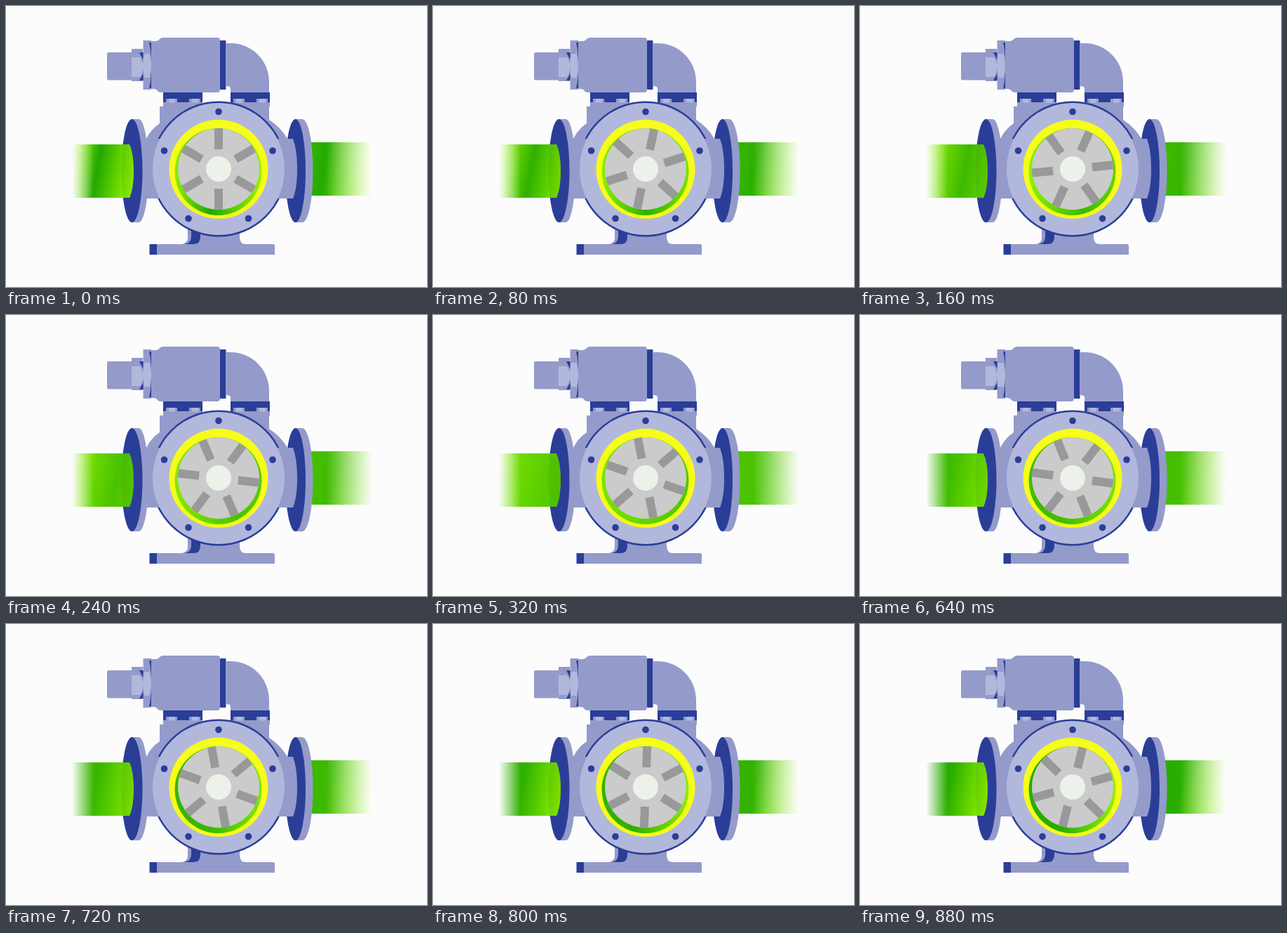
Recreate the animation shown at these times as an HTML page. Size 600 px wide and 400 px high, loop 960 ms.

```html
<!DOCTYPE html>
<html lang="en">
<head>
<meta charset="utf-8">
<title>Vane pump</title>
<style>
  html, body { margin: 0; width: 100%; height: 100%; overflow: hidden; background: #fcfcfc; }
  svg { display: block; width: 600px; height: 400px; }
  .mid { fill: #949bca; }
  .light { fill: #b2b8dc; }
  .dark { fill: #2a3e98; }
</style>
</head>
<body>
<svg viewBox="0 0 600 400">
  <defs>
    <linearGradient id="inlet" gradientUnits="userSpaceOnUse" x1="95" y1="227" x2="182" y2="243"/>
    <linearGradient id="chamber" gradientUnits="userSpaceOnUse" x1="241" y1="236" x2="365" y2="236"/>
    <linearGradient id="outlet" gradientUnits="userSpaceOnUse" x1="436" y1="224" x2="521" y2="240"/>
    <linearGradient id="fadeIn">
      <stop offset="0" stop-color="#fcfcfc"/>
      <stop offset="1" stop-color="#fcfcfc" stop-opacity="0"/>
    </linearGradient>
    <linearGradient id="fadeOut">
      <stop offset="0" stop-color="#fcfcfc" stop-opacity="0"/>
      <stop offset="1" stop-color="#fcfcfc"/>
    </linearGradient>
    <clipPath id="pipe"><path d="M94 197H176Q182 210 182 235T176 273H94Z"/></clipPath>
    <clipPath id="rim"><path d="M200 130H406V189H200ZM200 274H406V335H200Z"/></clipPath>
    <clipPath id="rotorEdge"><circle cx="303" cy="232" r="58"/></clipPath>
  </defs>

  <!-- outlet pipe -->
  <rect x="434" y="194" width="87" height="76" fill="url(#outlet)"/>
  <rect x="456" y="193" width="66" height="78" fill="url(#fadeOut)"/>

  <!-- valve and elbow on top -->
  <rect class="mid" x="144" y="66" width="37" height="39.500" rx="2"/>
  <path class="mid" d="M179 61H195V107H179Z"/>
  <path class="dark" d="M190 66H196V106H190L195 97V76Z"/>
  <path class="light" d="M179 73H191Q195 79 195 87T191 101H179Z"/>
  <path class="mid" d="M195.500 49H207V119H195.500Z"/>
  <path class="dark" d="M204 52H209V117H204Q207 106 207 85T204 52Z"/>
  <path class="light" d="M197 68H204.500Q207 76 207 85T204.500 102H197Q195 95 195 85T197 68Z"/>
  <path class="mid" d="M207 50H214Q217 50 219 47Q221 45 224 45H301Q305 45 305 49V119Q305 123 301 123H221Q217 123 215 120Q214 118 210 118H207Z"/>
  <rect class="dark" x="305" y="49" width="8.500" height="70" rx="1"/>
  <path class="mid" d="M313.500 53H320C350 53 375 77 375 108V123H320V117Q320 114 313.500 114Z"/>
  <g id="feet"></g>

  <!-- housing -->
  <path class="mid" d="M219 143H375V162Q392 173 401 189V274H195V195L200 189Q206 176 219 167Z"/>

  <!-- base -->
  <path class="mid" d="M259 315H270V339H251Q259 337 259 330Z"/>
  <path class="dark" d="M264 315H279V339H254Q264 338 264 328Z"/>
  <path class="mid" d="M277 315H333V329Q333 339 342 339H381Q383 339 383 341V354H214V339H267Q277 339 277 329Z"/>
  <rect class="dark" x="204.500" y="339" width="10.500" height="15"/>

  <!-- flanges -->
  <path class="mid" d="M179 161H189C197 161 203 194 203 234.500S197 308 189 308H179Z"/>
  <ellipse class="dark" cx="179.500" cy="234.500" rx="15" ry="73.500"/>
  <path class="mid" d="M412 161H422C431 161 437.500 194 437.500 234.500S431 308 422 308H412Z"/>
  <ellipse class="dark" cx="412.500" cy="234.500" rx="14.500" ry="73.500"/>
  <path class="mid" d="M385 189H409Q415 205 415 232T409 274H385Z"/>

  <!-- inlet pipe -->
  <g clip-path="url(#pipe)">
    <rect x="94" y="197" width="90" height="76" fill="url(#inlet)"/>
    <ellipse cx="179.500" cy="234.500" rx="15" ry="73.500" fill="#2a8000" opacity=".14"/>
    <rect x="94" y="196" width="31" height="78" fill="url(#fadeIn)"/>
  </g>

  <!-- front plate -->
  <circle class="dark" cx="303" cy="232" r="96.500" clip-path="url(#rim)"/>
  <circle class="light" cx="303" cy="232" r="94"/>
  <g id="bolts" class="dark"></g>
  <circle cx="303" cy="232.300" r="70.500" fill="#f6fd18"/>
  <circle cx="302.500" cy="236" r="62" fill="url(#chamber)"/>

  <!-- rotor -->
  <circle cx="303" cy="232" r="58" fill="#cbcbcb"/>
  <g clip-path="url(#rotorEdge)"><g id="vanes" fill="#999"></g></g>
  <circle cx="303" cy="232" r="18" fill="#ecf1e9"/>
</svg>
<script>
  const STEP = 80, STEPS = 12, TURN = 12.22;
  const NS = "http://www.w3.org/2000/svg";
  const byId = id => document.getElementById(id);

  function add(parent, tag, attrs) {
    const el = document.createElementNS(NS, tag);
    for (const k in attrs) el.setAttribute(k, attrs[k]);
    parent.appendChild(el);
    return el;
  }

  const box = (parent, cls, x, y, width, height) =>
    add(parent, "rect", { class: cls, x, y, width, height });

  for (const x of [224, 320]) {
    const feet = byId("feet");
    box(feet, "dark", x, 123, 56, 14);
    box(feet, "mid", x, 137, 56, 6.5);
    for (const dx of [4, 37]) {
      box(feet, "mid", x + dx, 132, 16, 5.5);
      box(feet, "light", x + dx + 4, 132, 9, 5.5);
    }
  }

  for (const [cx, cy] of [[303, 150.5], [225.5, 206], [380, 206], [260, 302.5], [345.5, 302.5]])
    add(byId("bolts"), "circle", { cx, cy, r: 4.8 });

  for (let a = 0; a < 360; a += 60)
    add(byId("vanes"), "rect", { x: 297, y: 173, width: 12, height: 31, transform: `rotate(${a} 303 232)` });

  // Rows: step, middle stop position, then brightness at start, middle and end
  const inflow = [
    [0, .4, .9, 0, 1], [2, .62, .92, .22, .55], [4, .8, .75, .45, .42], [6, .5, .5, .5, .5],
    [8, .4, .25, .27, .75], [10, .37, .12, .12, .9], [11, .36, .05, .06, .95]
  ];
  const outflow = [
    [0, .22, .12, .02, 1], [2, .32, .22, .16, .75], [4, .4, .36, .33, .6], [6, .5, .5, .5, .5],
    [8, .3, .3, .3, .8], [10, .28, .14, .14, .95], [11, .26, .06, .06, 1]
  ];

  function flowAt(rows, step) {
    let i = 1;
    while (i < rows.length - 1 && rows[i][0] < step) i++;
    const a = rows[i - 1], b = rows[i], k = (step - a[0]) / (b[0] - a[0]);
    return a.map((v, j) => v + (b[j] - v) * k).slice(1);
  }

  const green = v => `rgb(${Math.round(34 + 118 * v)},${Math.round(168 + 78 * v)},0)`;

  const flows = [["inlet", inflow], ["chamber", inflow], ["outlet", outflow]].map(([id, rows]) => ({
    rows, stops: [0, .5, 1].map(offset => add(byId(id), "stop", { offset }))
  }));

  function draw(ms) {
    const step = Math.floor(ms / STEP) % STEPS;
    byId("vanes").setAttribute("transform", `rotate(${step * TURN} 303 232)`);
    for (const { rows, stops } of flows) {
      const [mid, ...values] = flowAt(rows, step);
      stops[1].setAttribute("offset", mid);
      stops.forEach((s, i) => s.setAttribute("stop-color", green(values[i])));
    }
  }

  const start = performance.now();
  function tick() {
    draw(performance.now() - start);
    requestAnimationFrame(tick);
  }
  tick();
</script>
</body>
</html>
```
